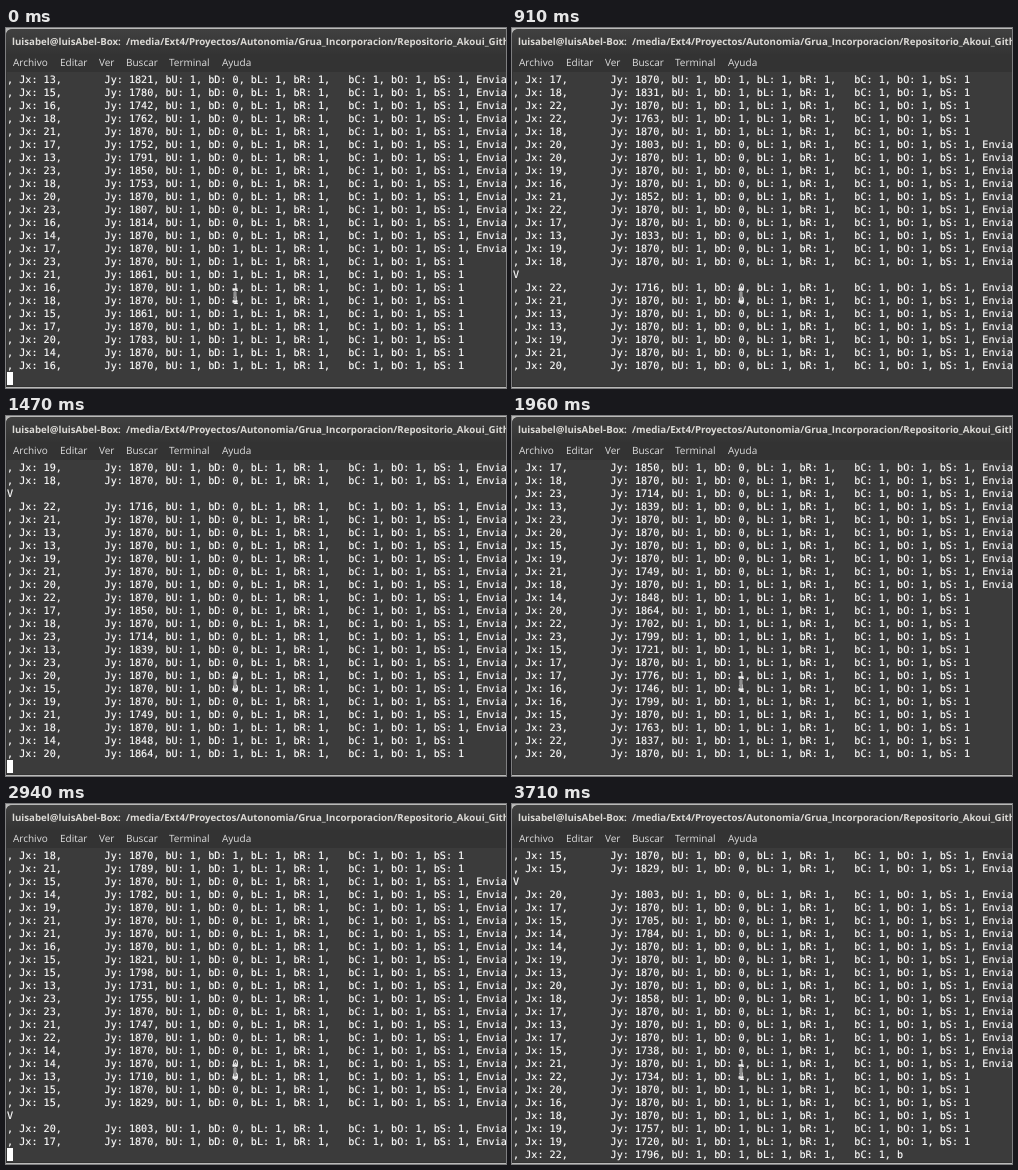
Animation, 500 px wide and 360 px high, one loop 3.78 s. Source, as an HTML page:

```html
<!DOCTYPE html>
<html lang="es">
<head>
<meta charset="utf-8">
<title>Terminal</title>
<style>
  html, body { margin: 0; width: 100%; height: 100%; overflow: hidden; background: #3b3b3b; }
  svg { display: block; }
  text { white-space: pre; text-rendering: geometricPrecision; }
  .title { font: bold 9.7px "Open Sans", "Noto Sans", sans-serif; fill: #dcdad6; }
  .menu { font: 10px "Open Sans", "Noto Sans", sans-serif; fill: #dfdfdf; }
  .log { font: 10.13px "DejaVu Sans Mono", monospace; fill: #fff; stroke: #fff; stroke-width: .15px; }
</style>
</head>
<body>
<svg width="500" height="360" viewBox="0 0 500 360">
  <defs>
    <linearGradient id="bar" x2="0" y2="1">
      <stop offset="0" stop-color="#404040"/>
      <stop offset="1" stop-color="#343434"/>
    </linearGradient>
  </defs>
  <rect width="500" height="360" fill="#b9b9b8"/>
  <path d="M0 359V8Q0 1 7 1H500V359Z" fill="#333"/>
  <path d="M0 26V8Q0 1 7 1H500V26Z" fill="url(#bar)"/>
  <rect x="1" y="44" width="499" height="314" fill="#3b3b3b"/>
  <g class="title">
    <text x="6" y="17">luisabel@luisAbel-Box:</text>
    <text x="120" y="17">/media/Ext4/Proyectos/Autonomia/Grua_Incorporacion/Repositorio_Akoui_Github</text>
  </g>
  <g class="menu">
    <text x="7" y="38">Archivo</text>
    <text x="54" y="38">Editar</text>
    <text x="93" y="38">Ver</text>
    <text x="120" y="38">Buscar</text>
    <text x="163" y="38">Terminal</text>
    <text x="216" y="38">Ayuda</text>
  </g>
  <g class="log" id="log"></g>
  <rect id="cursor" y="344" width="6" height="13" fill="#fff"/>
  <g fill="none">
    <path id="beam" d="M226.5 261.5H228L229 262.5L230 261.5H231.5M229 262.5V272.5M226.5 273.5H228L229 272.5L230 273.5H231.5" stroke="#eee" stroke-width="2.6"/>
    <path d="M229 262.5V272.5" stroke="#333"/>
  </g>
</svg>
<script>
const LOOP = 3780, STEP = 70, ROWS = 24, ROW_H = 13, COL_W = 6.1, FULL = 85;

// Where the button state flips: sending, idle, sending, ...
const flips = [14, 28, 57, 72, 105];
const wraps = [38, 90];

// Lines printed at a few steps of the loop.
const pace = [[0, 23], [13, 46], [21, 59], [28, 70], [36, 83], [48, 103.98], [53, 111.76]];

let seed = 7;
function random() {
  seed = (seed * 16807) % 2147483647;
  return seed / 2147483647;
}

// Joystick readings: jx jitters around its rest value, jy mostly sits at its ceiling.
function reading(i) {
  const jx = 13 + Math.floor(random() * 11);
  const jy = random() < 0.6 ? 1870 : 1870 - Math.floor(random() * 170);
  if (wraps.includes(i)) return "V";
  const sending = flips.filter(f => f <= i).length % 2 === 0;
  const released = !sending || flips.includes(i + 1);
  const head = `, Jx: ${jx},`.padEnd(16);
  const pad = `Jy: ${jy}, bU: 1, bD: ${released ? 1 : 0}, bL: 1, bR: 1,`.padEnd(40);
  return head + pad + "bC: 1, bO: 1, bS: 1" + (sending ? ", Enviado" : "");
}

const lines = Array.from({ length: 112 }, (_, i) => reading(i));

const log = document.getElementById("log");
const cursor = document.getElementById("cursor");
const rows = Array.from({ length: ROWS }, (_, i) => {
  const el = document.createElementNS("http://www.w3.org/2000/svg", "text");
  el.setAttribute("x", 1);
  el.setAttribute("y", 55.1 + i * ROW_H);
  return log.appendChild(el);
});

function printed(step) {
  const k = Math.max(1, pace.findIndex(p => step <= p[0]));
  const [s0, n0] = pace[k - 1], [s1, n1] = pace[k];
  return n0 + (n1 - n0) * (step - s0) / (s1 - s0) + 1e-9;
}

function draw(step) {
  const n = printed(step), done = Math.floor(n), part = n - done;
  // Lines mostly land whole; only a nearly finished one shows early.
  const chars = part >= 0.75 ? Math.floor(part * FULL) : 0;
  const top = done - ROWS + 1;
  rows.forEach((el, i) => {
    const line = lines[top + i] || "";
    el.textContent = i < ROWS - 1 ? line : line.slice(0, chars);
  });
  const blink = Math.floor(Math.max(0, step * STEP - 115) / 600);
  cursor.setAttribute("x", 1 + chars * COL_W);
  cursor.setAttribute("visibility", blink % 2 ? "hidden" : "visible");
}

let last = -1;
function tick() {
  const step = Math.floor(performance.now() % LOOP / STEP);
  if (step !== last) draw(last = step);
  requestAnimationFrame(tick);
}
tick();
</script>
</body>
</html>
```
